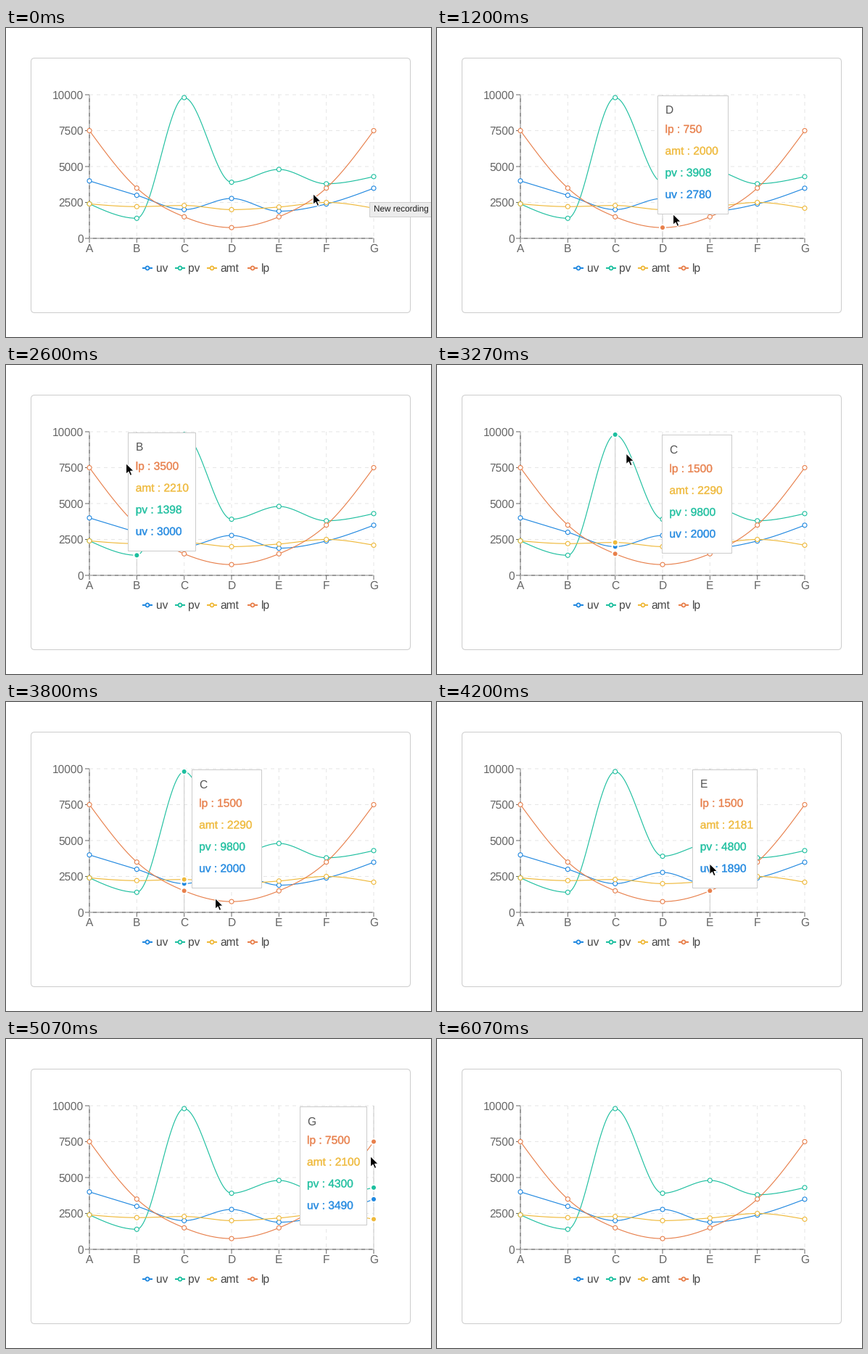
Write a matplotlib script that moves like this. It is 586 px wide and 426 px high and loops after 6940 ms.

```python
import numpy as np
import matplotlib.pyplot as plt
from matplotlib.animation import FuncAnimation
from matplotlib.patches import Circle, FancyBboxPatch, Polygon, Rectangle
from matplotlib.patheffects import Stroke

W, H, DPI = 586, 426, 64
PX = 72 / DPI                      # one pixel in points
LOOP, STEP = 6940, 20
TICK = 200 / 3                     # the screen updates 15 times a second

plt.rcParams["font.family"] = "Liberation Sans"
plt.rcParams["text.hinting"] = "none"

LEFT, RIGHT, TOP, BOTTOM = 115, 507, 92, 290
GAP = (RIGHT - LEFT) / 6
NAMES = "ABCDEFG"
XS = LEFT + GAP * np.arange(7)

# name: colour, legend x, values
SERIES = {
    "uv": ("#2088e0", 188, [4000, 3000, 2000, 2780, 1890, 2390, 3490]),
    "pv": ("#1dbf9f", 233, [2400, 1398, 9800, 3908, 4800, 3800, 4300]),
    "amt": ("#efb93a", 277, [2400, 2210, 2290, 2000, 2181, 2500, 2100]),
    "lp": ("#e8804c", 333, [7500, 3500, 1500, 750, 1500, 3500, 7500]),
}
TIP_H, TIP_EASE, LAG = 163, 400, 35
HINT_END, TIP_START, TIP_END, MOUSE_END = 730, 955, 5525, 5595

# key points of the pointer: time, x, y
PATH = np.array([
    (0, 423, 228), (270, 436, 209), (700, 432, 214),
    (1200, 325, 256), (1620, 325, 256),
    (2400, 145, 152), (2600, 165, 135), (2850, 322, 124), (3100, 316, 122),
    (3180, 275, 113), (3270, 260, 122), (3450, 252, 190), (3760, 276, 267),
    (3800, 288, 270), (4340, 411, 200), (4600, 498, 163),
    (5000, 502, 161), (LOOP, 502, 161),
])


def y_px(v):
    return BOTTOM - np.asarray(v) * (BOTTOM - TOP) / 10000


def monotone(x, y, q):
    """Monotone cubic through (x, y), evaluated at q."""
    x, y = np.asarray(x, float), np.asarray(y, float)
    h = np.diff(x)
    s = np.diff(y) / h
    p = (s[:-1] * h[1:] + s[1:] * h[:-1]) / (h[1:] + h[:-1])
    low = np.minimum(np.minimum(abs(s[:-1]), abs(s[1:])), abs(p) / 2)
    inner = (np.sign(s[:-1]) + np.sign(s[1:])) * low
    m = np.concatenate([[(3 * s[0] - inner[0]) / 2], inner,
                        [(3 * s[-1] - inner[-1]) / 2]])
    i = np.clip(np.searchsorted(x, q, side="right") - 1, 0, len(h) - 1)
    u = (q - x[i]) / h[i]
    return (y[i] * (1 + 2 * u) * (1 - u) ** 2 + y[i + 1] * u * u * (3 - 2 * u)
            + h[i] * (m[i] * u * (1 - u) ** 2 + m[i + 1] * u * u * (u - 1)))


def mouse_at(t):
    return np.array([monotone(PATH[:, 0], PATH[:, k], t) for k in (1, 2)])


# CSS "ease" curve
_s = np.linspace(0, 1, 200)
EASE_X = 0.75 * _s * (1 - _s) + _s ** 3
EASE_Y = 0.3 * _s * (1 - _s) ** 2 + 3 * _s ** 2 * (1 - _s) + _s ** 3


def tip_width(i):
    """The longest row sets the width; the digit 1 is narrow."""
    return 96.5 - 4 * str(SERIES["amt"][2][i]).count("1")


def tip_goal(i, high):
    x = XS[i] + 10
    if x + tip_width(i) > RIGHT:
        x = XS[i] - 10 - tip_width(i)
    return np.array([x, TOP + (16 if high else 0.5)])


def tip_at(t):
    """Tooltip corner and active index at time t."""
    t0, a, b, i = [m for m in moves if m[0] <= t][-1]
    return a + (b - a) * np.interp((t - t0) / TIP_EASE, EASE_X, EASE_Y), i


# each new goal restarts the tooltip's transition from where it is
moves = [(0, tip_goal(0, False), tip_goal(0, False), 0)]
state = None
for t in range(TIP_START, TIP_END, 5):
    mx, my = mouse_at(t - LAG)
    now = (int(np.clip(round((mx - LEFT) / GAP), 0, 6)), bool(my < 117))
    if now != state:
        moves.append((t, tip_at(t)[0], tip_goal(*now), now[0]))
        state = now


fig = plt.figure(figsize=(W / DPI, H / DPI), dpi=DPI, facecolor="white")
ax = fig.add_axes([0, 0, 1, 1])
ax.set_xlim(0, W)
ax.set_ylim(H, 0)
ax.axis("off")


def line(x, y, color, width=1.0, z=2, **kw):
    return ax.plot(x, y, color=color, lw=width * PX, zorder=z, snap=False,
                   solid_capstyle="butt", **kw)[0]


def dot(x, y, face, edge, r, width, z):
    return ax.add_patch(Circle((x, y), r, fc=face, ec=edge, lw=width * PX,
                               zorder=z))


def label(x, y, s, color="#666666", size=15.5, z=3, **kw):
    return ax.text(x, y, s, color=color, fontsize=size * PX, zorder=z,
                   va="baseline", **kw)


# card
ax.add_patch(FancyBboxPatch((34.5, 41.5), 523, 351, fc="white", ec="#cccccc",
                            lw=PX, boxstyle="round,pad=0,rounding_size=5"))

# axes, ticks and grid
AXIS, GRID = "#666666", "#e6e6e6"
line([LEFT, LEFT], [TOP, BOTTOM], AXIS, 1.3)
line([LEFT, RIGHT], [BOTTOM, BOTTOM], AXIS, 1.3)
for x, name in zip(XS, NAMES):
    line([x, x], [BOTTOM, BOTTOM + 6], AXIS)
    line([x, x], [TOP, BOTTOM], GRID, dashes=(5, 5))
    label(x, 309, name, ha="center")
for v in range(0, 10001, 2500):
    y = float(y_px(v))
    line([LEFT - 6, LEFT], [y, y], AXIS)
    line([LEFT, RIGHT], [y, y], GRID, dashes=(5, 5))
    label(107, y + 5.5, str(v), ha="right")

guide = line([0, 0], [TOP, BOTTOM], "#cccccc", z=2.5)

# curves and legend
qx = np.linspace(LEFT, RIGHT, 240)
active = []
for k, (name, (color, lx, data)) in enumerate(SERIES.items()):
    z = 3 + k / 10
    ys = y_px(data)
    line(qx, monotone(XS, ys, qx), color, 1.15, z)
    for x, y in zip(XS, ys):
        dot(x, y, "white", color, 3, 1.1, z + 0.05)
    active.append(dot(0, 0, color, "white", 4, 2, z + 1))
    line([lx, lx + 14], [331, 331], color, 2)
    dot(lx + 7, 331, "white", color, 2.5, 1.8, 2.2)
    label(lx + 18.5, 335.5, name, "#444444")

# system hint
hint = [
    ax.add_patch(Rectangle((500.5, 239.5), 100, 20, fc="#ececec",
                           ec="#cfcfcf", lw=PX, zorder=8)),
    label(507, 253.5, "New recording", "#1c1c1c", 11.8, 9),
]

# tooltip
box = ax.add_patch(Rectangle((0, 0), 95, TIP_H, fc="white", ec="#cccccc",
                             lw=PX, zorder=10))
title = label(0, 0, "", "#555555", z=11)
rows = {}
for name in reversed(SERIES):
    color = SERIES[name][0]
    rows[name] = label(0, 0, "", color, z=11)
    rows[name].set_path_effects([Stroke(linewidth=0.4 * PX,
                                        foreground=color)])
tip_parts = [box, title, guide, *active, *rows.values()]

ARROW = np.array([(0, 0), (0, 15), (3.5, 11.8), (5.8, 17), (8.3, 15.9),
                  (6.1, 10.8), (10.8, 10.6)]) + 0.5
mouse = ax.add_patch(Polygon(ARROW, fc="black", ec="white", lw=1.1 * PX,
                             joinstyle="round", zorder=12))


def place_tip(t):
    (x, y), i = tip_at(t)
    box.set_bounds(x, y, tip_width(i), TIP_H)
    title.set_position((x + 10.5, y + 26))
    title.set_text(NAMES[i])
    for k, (name, row) in enumerate(rows.items()):
        row.set_position((x + 10.5, y + 52 + 30 * k))
        row.set_text(f"{name} : {SERIES[name][2][i]}")
    guide.set_xdata([XS[i], XS[i]])
    for mark, (_, _, data) in zip(active, SERIES.values()):
        mark.center = XS[i], y_px(data[i])


def draw(n):
    t = int((n * STEP + 10) / TICK) * TICK
    shown = TIP_START <= t < TIP_END
    for part in tip_parts:
        part.set_visible(shown)
    if shown:
        place_tip(t)
    for part in hint:
        part.set_visible(t < HINT_END)
    mouse.set_visible(t < MOUSE_END)
    mouse.set_xy(ARROW + mouse_at(t))
    return [*tip_parts, *hint, mouse]


anim = FuncAnimation(fig, draw, frames=LOOP // STEP, interval=STEP,
                     repeat=True, repeat_delay=0, blit=False)
plt.show()
```
